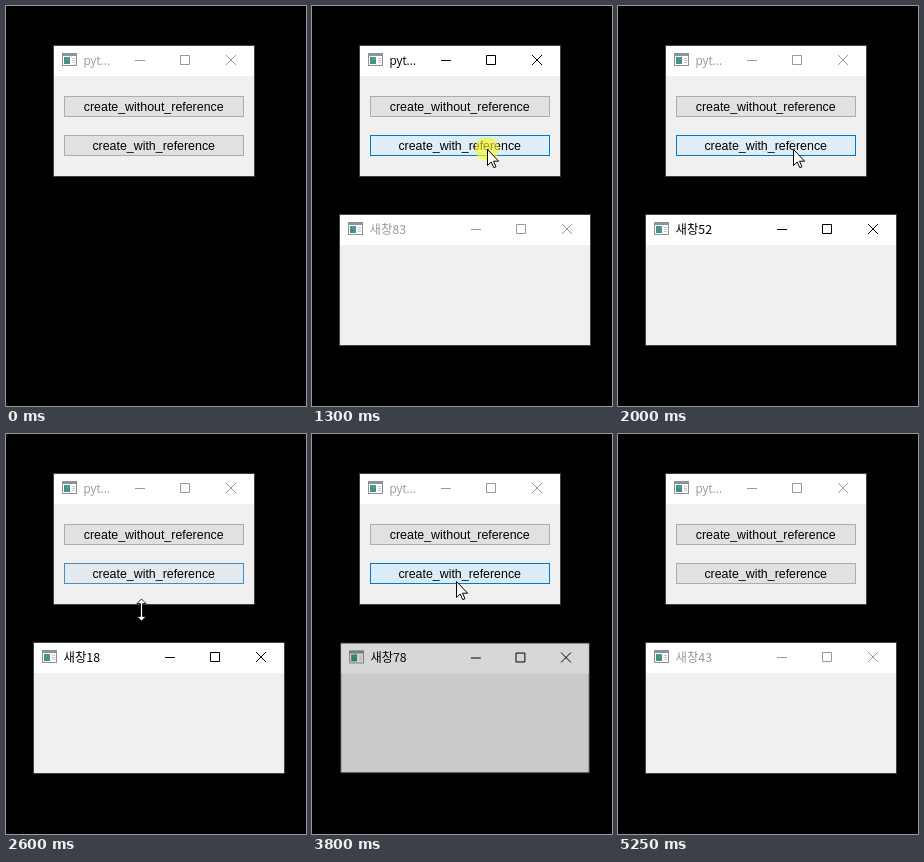
An HTML page for the animation above (5300 ms loop, 300 by 400 pixels).

```html
<!DOCTYPE html>
<html lang="ko">
<head>
<meta charset="utf-8">
<style>
html, body { margin: 0; width: 100%; height: 100%; overflow: hidden; background: #000; }
svg { display: block; }
.title { font: 12.4px "Noto Sans CJK KR", "Noto Sans CJK", sans-serif; }
.latin { font: 11.8px "Open Sans", sans-serif; }
.button text { font: 12.4px "Liberation Sans", Arial, sans-serif; text-anchor: middle; }
.button rect { fill: #e1e1e1; stroke: #adadad; }
</style>
</head>
<body>
<svg id="stage" width="300" height="400" viewBox="0 0 300 400"></svg>
<script>
const LOOP = 5300, STEP = 50;

// press time, time the new window is fully open, its title
const clicks = [
  [700, 950, '새창83'], [1300, 1500, '새창13'], [1750, 2000, '새창52'],
  [2350, 2550, '새창18'], [3600, 3850, '새창78'], [4100, 4350, '새창43']
];

// time, x, y of the pointer
const path = [
  [200, 225, 343], [650, 175, 143], [2500, 175, 143], [2600, 135, 176],
  [2850, 75, 225], [3050, 50, 246], [3150, 49, 247], [3400, 130, 175],
  [3550, 144, 147], [4750, 144, 147], [5000, 281, 390]
];

const icon = `
  <rect x="8.5" y="7.5" width="14" height="12" fill="#fff" stroke="#8b9598"/>
  <rect x="8" y="7" width="15" height="3" fill="#8b9598"/>
  <rect x="10" y="11" width="6" height="7" fill="#45947f"/>
  <rect x="12" y="11" width="4" height="3" fill="#5c8fae"/>
  <path d="M18 12.5h3M18 14.5h3M18 16.5h3" stroke="#c3c8ca"/>`;

const frame = (id, x, y, w, textClass, title, body = '') => `
  <g id="${id}"><g transform="translate(${x} ${y})">
    <rect x="-.5" y="-.5" width="${w + 1}" height="131" fill="#f0f0f0" stroke="#3c4240"/>
    <rect width="${w}" height="30" fill="#fff"/>
    ${icon}
    <text class="title ${textClass}" x="29.5" y="19">${title}</text>
    <path class="controls" fill="none" d="M${w - 119} 14.5h10
      M${w - 73.5} 9.5h9v9h-9z M${w - 28} 9l10 10m0-10l-10 10"/>
    ${body}
  </g></g>`;

const button = (id, y, label) => `
  <g class="button" id="${id}">
    <rect x="10.5" y="${y + .5}" width="179" height="20"/>
    <text x="99.7" y="${y + 15}">${label}</text>
  </g>`;

const $ = id => document.getElementById(id);

$('stage').innerHTML = `
  <rect width="300" height="400"/>
  ${frame('main', 48, 40, 200, 'latin', 'pyt...',
    button('plain', 50, 'create_without_reference') +
    button('kept', 89, 'create_with_reference'))}
  ${frame('child', 28, 209, 250, '', '')}
  <circle id="ring" r="12" fill="#fbf920" opacity=".62"/>
  <path id="arrow" fill="#fff" stroke="#000"
    d="M.5.5V16.5L4.2 13L6.8 18.7L9 17.7L6.5 12.2H11.6Z"/>
  <path id="resize" fill="#fff" stroke="#000" stroke-width=".8"
    d="M.5-11L5-6.5H1.5V6.5H5L.5 11L-4 6.5H-.5V-6.5H-4Z"/>`;

const show = (id, on) => $(id).setAttribute('visibility', on ? 'visible' : 'hidden');

function pointer(t) {
  const i = path.findIndex(p => p[0] >= t);
  if (t < path[0][0] || i < 0) return null;
  const b = path[i], a = path[i - 1] || b;
  const k = b === a ? 0 : (t - a[0]) / (b[0] - a[0]);
  return { x: a[1] + (b[1] - a[1]) * k, y: a[2] + (b[2] - a[2]) * k };
}

const pressed = t => clicks.some(([down, end]) => t >= down && t < end - 150);

function hovered(t) {
  const p = pointer(t);
  return !!p && p.x >= 58 && p.x < 238 && p.y >= 129 && p.y < 150;
}

const mix = (a, b, k) => a.map((v, i) => v + (b[i] - v) * k);
const rgb = c => `rgb(${c.map(Math.round)})`;

// The button colours trail the pointer by a few steps
function paintButton(t) {
  let over = 0, down = 0;
  for (let i = 0; i < 5; i++) {
    over += hovered(t - i * STEP) / 5;
    down += pressed(t - i * STEP) / 5;
  }
  const face = mix(mix([225, 225, 225], [229, 241, 251], over), [204, 228, 247], down);
  const box = $('kept').querySelector('rect');
  box.style.fill = rgb(face);
  box.style.stroke = rgb(mix([173, 173, 173], [0, 120, 215], over));
}

function paintActive(id, active) {
  $(id).querySelector('.title').setAttribute('fill', active ? '#000' : '#999');
  $(id).querySelector('.controls').setAttribute('stroke', active ? '#000' : '#999');
}

function paintChild(t) {
  const click = clicks.filter(c => t >= c[1] - 150).pop();
  show('child', click);
  if (!click) return;
  const left = Math.max(0, (click[1] - t) / STEP);
  const size = 1 - left * .01;
  const child = $('child');
  child.querySelector('.title').textContent = click[2];
  child.setAttribute('opacity', [1, .845, .655, .4][Math.ceil(left)]);
  child.setAttribute('transform', `translate(153 274) scale(${size}) translate(-153 -274)`);
}

function draw(now) {
  const t = Math.floor(now % LOOP / STEP) * STEP;
  const p = pointer(t), down = pressed(t);
  paintActive('main', down);
  paintActive('child', !down && t < 5250);
  paintChild(t);
  paintButton(t);

  const onEdge = p && p.y > 169 && p.y < 179 && p.x > 48 && p.x < 248;
  show('ring', p && down);
  show('arrow', p && !onEdge);
  show('resize', onEdge);
  if (p) {
    const at = `translate(${Math.round(p.x)} ${Math.round(p.y)})`;
    for (const id of ['ring', 'arrow', 'resize']) $(id).setAttribute('transform', at);
  }
}

const start = performance.now();
function tick() {
  draw(performance.now() - start);
  requestAnimationFrame(tick);
}
tick();
</script>
</body>
</html>
```
